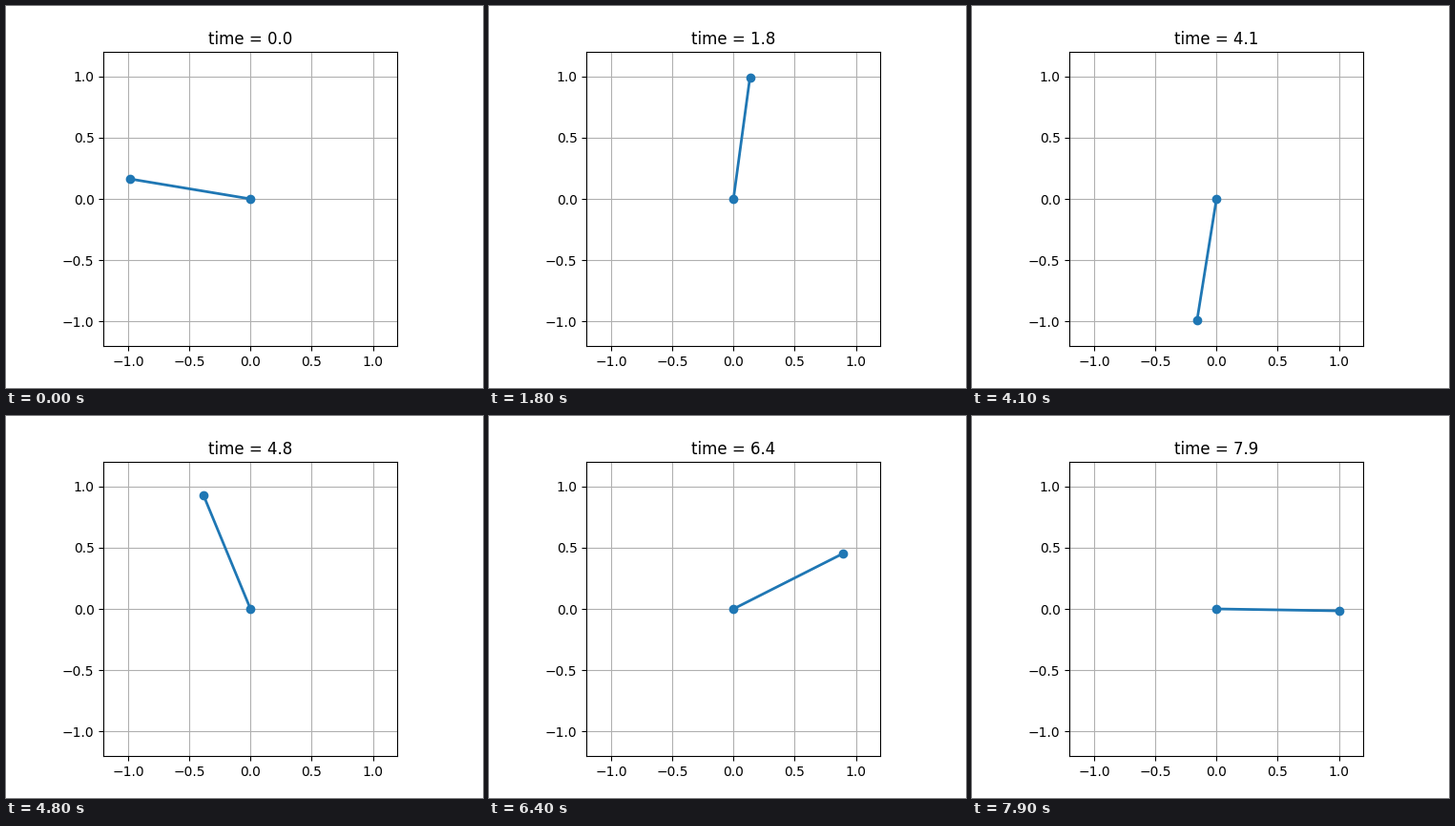
Recreate the animation shown at these times as a matplotlib script. Size 500 by 400 pixels, loop 8 s.

```python
import numpy as np
import matplotlib.pyplot as plt
from matplotlib.animation import FuncAnimation

G = 9.8
FPS = 10
FRAMES = 80

# (time, angle in degrees from straight down); the rod keeps turning clockwise
WAYPOINTS = [(0.0, -99.4), (0.9, -339.5), (2.7, -785.7), (4.1, -1089.1),
             (5.5, -1266.6), (6.4, -1323.2), (7.9, -1710.9)]


def travel_times(theta, energy):
    """Time at which a free pendulum of this energy reaches each angle."""
    slowness = 1 / np.sqrt(2 * (energy + G * np.cos(theta)))
    steps = np.abs(np.diff(theta)) * (slowness[1:] + slowness[:-1]) / 2
    return np.concatenate(([0], np.cumsum(steps)))


def swing(start, end):
    """Pendulum arc between two waypoints, with energy fitted to the duration."""
    (t0, a0), (t1, a1) = start, end
    theta = np.radians(np.linspace(a0, a1, 4000))
    low = np.max(-G * np.cos(theta)) + 1e-6
    high = low + 500
    for _ in range(60):
        energy = (low + high) / 2
        if travel_times(theta, energy)[-1] > t1 - t0:
            low = energy
        else:
            high = energy
    times = travel_times(theta, energy)
    return t0 + times * (t1 - t0) / times[-1], theta


arcs = [swing(a, b) for a, b in zip(WAYPOINTS, WAYPOINTS[1:])]
path_t = np.concatenate([t for t, _ in arcs])
path_theta = np.concatenate([theta for _, theta in arcs])
angles = np.interp(np.arange(FRAMES) / FPS, path_t, path_theta)

fig, ax = plt.subplots(figsize=(5, 4), dpi=100)
ax.set_aspect("equal")
ax.set_xlim(-1.2, 1.2)
ax.set_ylim(-1.2, 1.2)
ticks = np.arange(-1, 1.1, 0.5)
ax.set_xticks(ticks)
ax.set_yticks(ticks)
ax.grid()
rod, = ax.plot([], [], "o-", lw=2)
title = ax.set_title("time = 0.0")


def update(i):
    rod.set_data([0, np.sin(angles[i])], [0, -np.cos(angles[i])])
    title.set_text(f"time = {i / FPS:.1f}")
    return rod, title


anim = FuncAnimation(fig, update, frames=FRAMES, interval=1000 / FPS,
                     repeat=True, repeat_delay=0)
plt.show()
```
